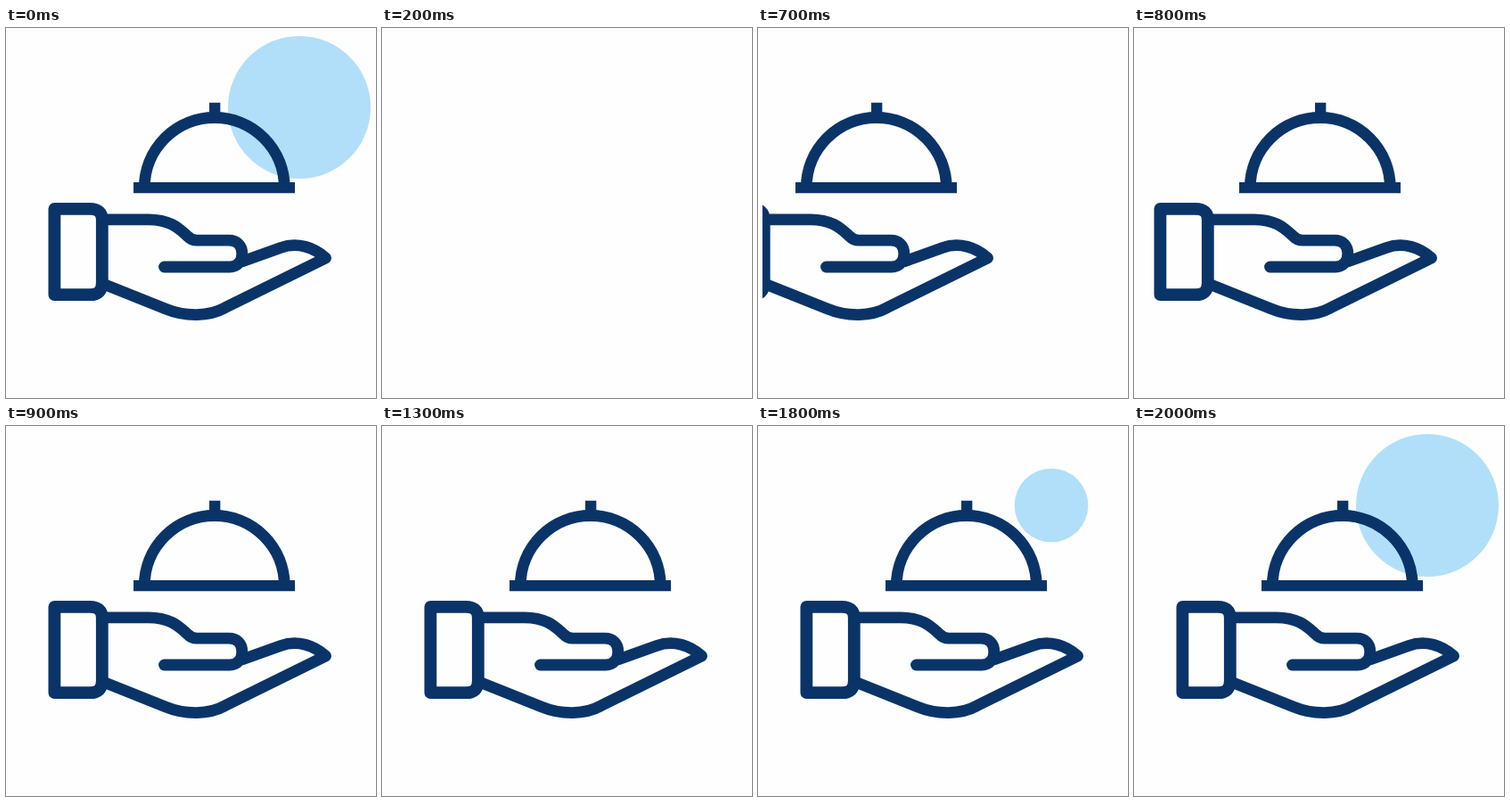
Recreate the animation shown at these times as an HTML page. Size 415 by 415 pixels, loop 2100 ms.

```html
<!DOCTYPE html>
<html lang="en">
<head>
<meta charset="utf-8">
<title>Service</title>
<style>
  html, body { margin: 0; width: 100%; height: 100%; overflow: hidden; background: #fdfefd; }
  svg { display: block; width: 100vw; height: 100vh; }
</style>
</head>
<body>
<svg viewBox="0 0 415 415">
  <clipPath id="window"><rect x="5" width="410" height="415"/></clipPath>
  <g id="scene">
    <circle id="sun" cx="329" cy="89" r="80" fill="#b1dff9"/>
    <g clip-path="url(#window)">
      <g id="icon" fill="none" stroke="#0a3468" stroke-width="12.8" stroke-linejoin="round">
        <path d="M155.3 179A78.5 78.5 0 0 1 312.3 179"/>
        <path stroke-width="12.3" d="M143 179.2H324M234.2 83.7V98"/>
        <path stroke-width="13.8" d="M54.4 202.8H94Q107.8 202.8 107.8 215V286Q107.8 299.2 94 299.2H54.4Z"/>
        <path stroke-linecap="round" d="M108 214.8H160C185 214.8 195 226 203 233Q208 238.2 214 238.2H250C259 238.2 264.8 244 264.8 253C264.8 262 259 268 251 268H177.5"/>
        <path d="M264 262.2L308 246.4C327 239.4 346 246.4 358.6 258L246 313.6C228 323.6 202 324.6 178 314.6L108 286.6"/>
      </g>
    </g>
  </g>
</svg>
<script>
  const LOOP = 2100, STEP = 100;
  const $ = id => document.getElementById(id);
  const scene = $("scene"), icon = $("icon"), sun = $("sun");

  function draw(now) {
    // The motion advances ten times a second.
    const t = Math.floor(now % LOOP / STEP) * STEP;
    const leaving = t < 400;
    const slide = leaving ? 0 : Math.min(0, 0.76 * (t - 500) - 253);
    const radius = leaving ? 80 : t < 1700 ? 0 : 22 + (t - 1700) * 58 / 300;

    scene.setAttribute("opacity", leaving ? Math.max(0, 1 - t / 200) : 1);
    icon.setAttribute("transform", `translate(${slide} 0)`);
    sun.setAttribute("r", radius);
  }

  let start;
  function tick(now) {
    start ??= now;
    draw(now - start);
    requestAnimationFrame(tick);
  }
  draw(0);
  requestAnimationFrame(tick);
</script>
</body>
</html>
```
